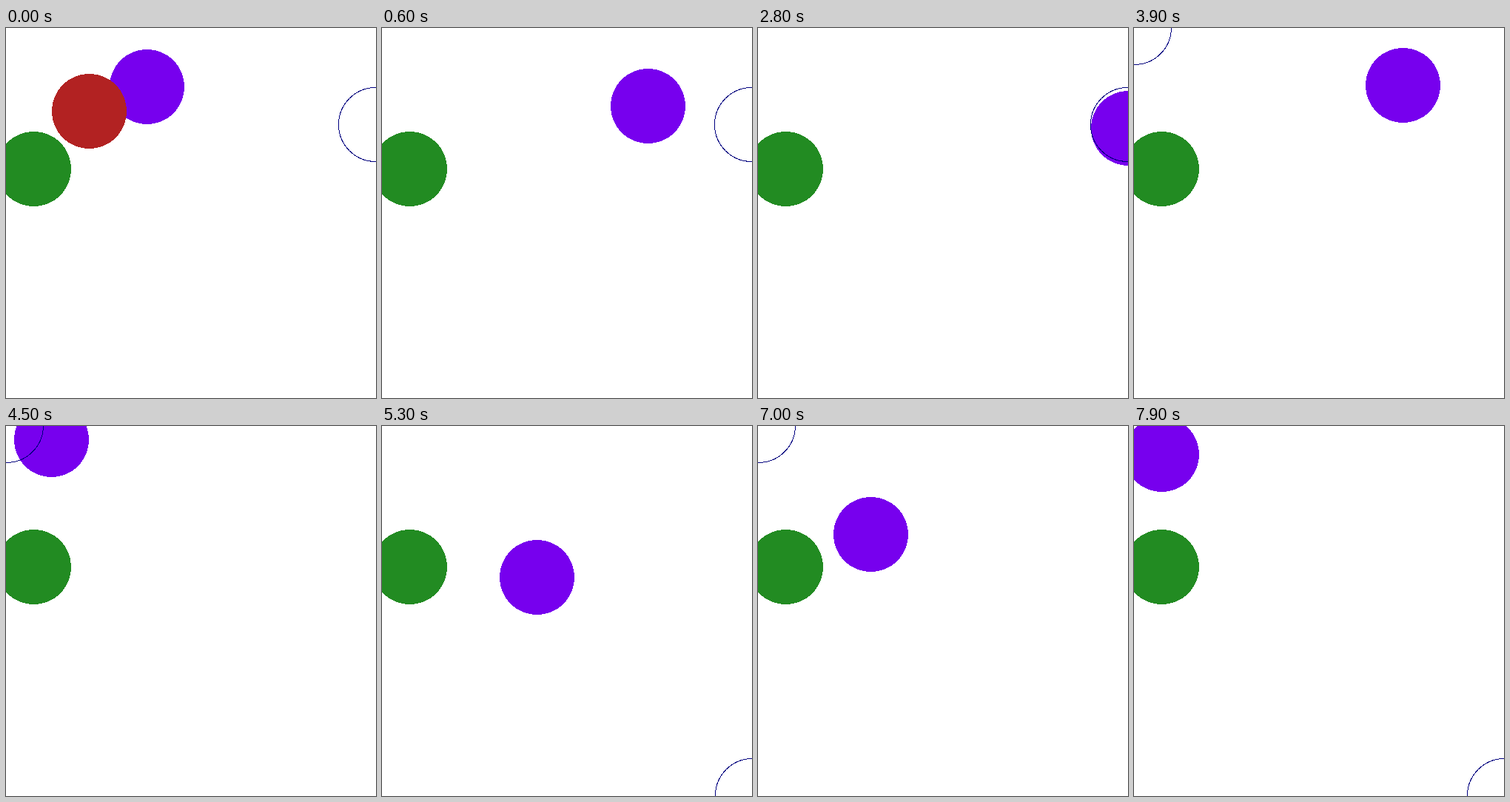
Write an HTML page that moves like this. It is 500x500 px and loops after 8 s.

```html
<!DOCTYPE html>
<html lang="en">
<head>
<meta charset="utf-8">
<title>Circle chasing a ring</title>
<style>
html, body { margin: 0; width: 100%; height: 100%; overflow: hidden; background: #fff; }
svg { display: block; width: 500px; height: 500px; }
</style>
</head>
<body>
<svg viewBox="0 0 500 500" shape-rendering="crispEdges">
  <circle cx="37.5" cy="190.5" r="50.5" fill="#228b22"/>
  <circle id="chaser" r="50.5" fill="#7700ee"/>
  <circle id="red" cx="112.5" cy="112.5" r="50.5" fill="#b22222"/>
  <circle id="ring" r="50" fill="none" stroke="#000080" stroke-width="1"/>
</svg>
<script>
const LOOP = 8000, STEP = 100;

// step, x, y
const path = [
  [0, 190.5, 79.5], [5, 328, 101], [9, 464.5, 122.5], [10, 500.5, 129],
  [13, 500.5, 147.5], [18.5, 500.5, 165.5], [23, 500.5, 158], [27, 500.5, 140.5],
  [28, 500.5, 135.5], [32, 500.5, 118], [36, 497, 104.5], [38, 415, 88],
  [42, 197, 45], [45, 61.5, 18.5], [46, 32, 13], [48, 10.5, 9.5], [50, 48, 44],
  [54, 270, 266], [57, 437, 436], [59, 490.5, 490.5], [60, 487.5, 487.5],
  [63, 381.5, 378.5], [70, 152.5, 146.5], [72, 105.5, 102.5], [75, 61.5, 60.5],
  [78, 35.5, 35.5], [79, 37.5, 38.5]
];

// step, x, y of the ring from that step on
const stops = [
  [0, 499.5, 130.5], [35, 0.5, -0.5], [46, 500.5, 499.5],
  [58, 0.5, -0.5], [78, 500.5, 499.5]
];

const el = id => document.getElementById(id);
const chaser = el("chaser"), red = el("red"), ring = el("ring");
const snap = v => Math.floor(v) + 0.5;

// Slope at key i, flat at turning points
function slope(i, axis) {
  const a = path[i - 1], b = path[i], c = path[i + 1];
  if (!a) return (c[axis] - b[axis]) / (c[0] - b[0]);
  if (!c) return (b[axis] - a[axis]) / (b[0] - a[0]);
  const before = (b[axis] - a[axis]) / (b[0] - a[0]);
  const after = (c[axis] - b[axis]) / (c[0] - b[0]);
  return before * after <= 0 ? 0 : 2 * before * after / (before + after);
}

function along(s, axis) {
  let i = 0;
  while (i < path.length - 2 && s >= path[i + 1][0]) i++;
  const a = path[i], b = path[i + 1], span = b[0] - a[0];
  const u = (s - a[0]) / span, w = 1 - u;
  return w * w * (1 + 2 * u) * a[axis] + u * u * (3 - 2 * u) * b[axis]
    + span * u * w * (w * slope(i, axis) - u * slope(i + 1, axis));
}

function place(circle, x, y) {
  circle.setAttribute("cx", x);
  circle.setAttribute("cy", y);
}

function draw(now) {
  const s = Math.floor((now % LOOP) / STEP);
  const stop = stops.filter(p => p[0] <= s).pop();
  place(chaser, snap(along(s, 1)), snap(along(s, 2)));
  place(ring, stop[1], stop[2]);
  red.style.display = s < 1 ? "" : "none";
}

const start = performance.now();
function tick() {
  draw(performance.now() - start);
  requestAnimationFrame(tick);
}
tick();
</script>
</body>
</html>
```
